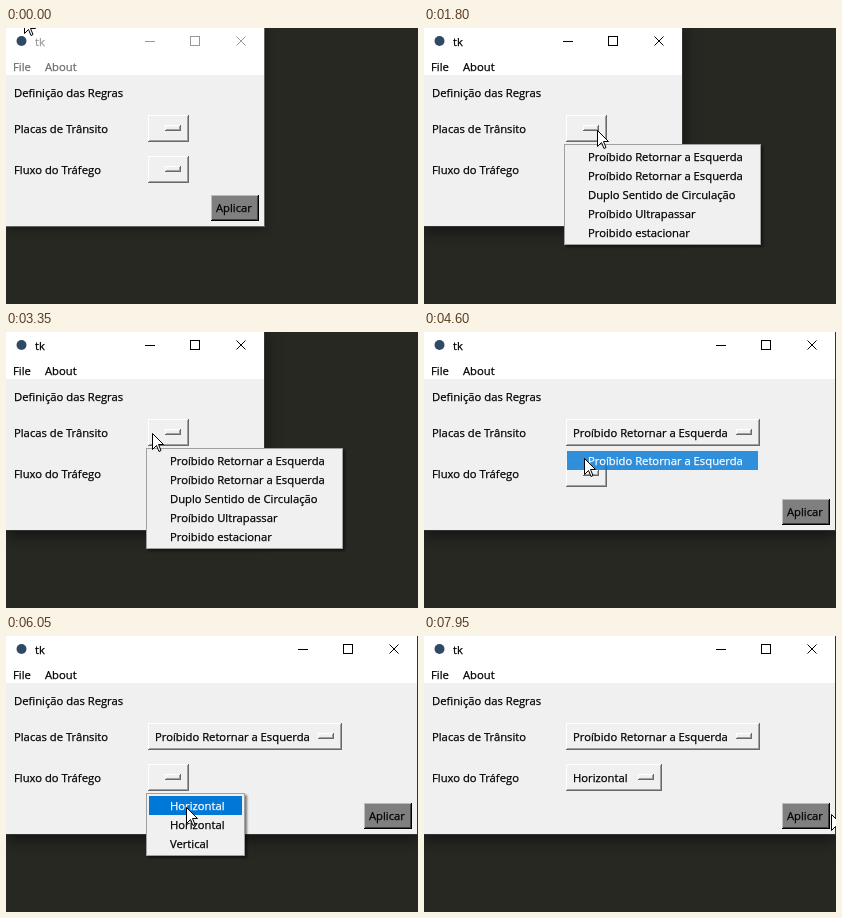
Recreate the animation shown at these times as an HTML page. Size 412 by 276 pixels, loop 8000 ms.

```html
<!DOCTYPE html>
<html lang="pt">
<head>
<meta charset="utf-8">
<title>tk</title>
<style>
  html, body { margin: 0; width: 100%; height: 100%; overflow: hidden; background: #272822; }
  svg { display: block; width: 412px; height: 276px; color: #000; }
  text {
    font: 11.25px "Open Sans", "Noto Sans", sans-serif; white-space: pre;
    fill: currentColor; stroke: currentColor; stroke-width: .25px;
  }
  rect, .edge { shape-rendering: crispEdges; }
  .line { stroke: currentColor; fill: none; }
  .menu { filter: drop-shadow(2px 2px 1px rgba(0, 0, 0, .5)); }
  .lit { color: #fff; }
</style>
</head>
<body>
<svg id="stage" viewBox="0 0 412 276"></svg>
<script>
const LOOP = 8000, TICK = 50, ROW = 19;
const FOCUS = 1600, FIRST = 4600, SECOND = 7450;
const LEFT = 'Proíbido Retornar a Esquerda';
const FACE = ['#f0f0f0', '#fff', '#a0a0a0', '#696969'];
const GRAY = ['#7f7f7f', '#bdbdbd', '#404040', '#000'];

// Each menu may open more than once; the last closing picks a row
const menus = [
  { id: 'signs', y: 116, w: 197, open: [[FOCUS, 1900], [2800, FIRST]],
    items: [LEFT, LEFT, 'Duplo Sentido de Circulação', 'Proíbido Ultrapassar', 'Proibido estacionar'] },
  { id: 'flows', y: 157, w: 99, open: [[5600, SECOND]],
    items: ['Horizontal', 'Horizontal', 'Vertical'] }
];

// Pointer moves: start, end, destination
const moves = [
  [100, 750, 178, 89], [1000, 1300, 173, 102], [2150, 2600, 171, 99],
  [3050, 3150, 152, 132], [3300, 3350, 146, 101], [3800, 4150, 160, 126],
  [4950, 5450, 175, 149], [5750, 6050, 180, 171], [7050, 7150, 180, 185],
  [7550, 7950, 407, 178]
];

const rect = (x, y, w, h, fill, cls = '') =>
  `<rect x="${x}" y="${y}" width="${w}" height="${h}" fill="${fill}" class="${cls}"/>`;
const text = (x, y, s) => `<text x="${x}" y="${y}">${s}</text>`;
const group = (id, body, cls = '') => `<g id="${id}" class="${cls}">${body}</g>`;

// Raised box: light top and left edges, dark bottom and right edges
const raised = (x, y, w, h, [fill, light, mid, dark]) =>
  rect(x, y, w, h, dark) + rect(x, y, w - 1, h - 1, light) +
  rect(x + 1, y + 1, w - 2, h - 2, mid) + rect(x + 1, y + 1, w - 3, h - 3, fill);

const option = (id, y, right, label) => group(id,
  raised(142, y, right - 142, 27, FACE) +
  raised(right - 24, y + 10, 16, 6, FACE) +
  text(149, y + 18, label));

const rowTop = (m, i) => m.y + 3 + i * ROW;
const label = (m, s, i) => text(164, rowTop(m, i) + 14, s);

const menu = m => group(m.id,
  rect(140, m.y, m.w, m.items.length * ROW + 6, '#a0a0a0') +
  rect(141, m.y + 1, m.w - 2, m.items.length * ROW + 4, '#f0f0f0') +
  m.items.map((s, i) => label(m, s, i)).join(''), 'menu') +
  m.items.map((s, i) => group(m.id + i,
    rect(143, rowTop(m, i), m.w - 6, ROW, '#0078d7') + label(m, s, i), 'lit')).join('');

stage.innerHTML =
  group('shadow', rect(0, -4, 259, 203, 'currentColor', 'border')) +
  rect(0, 0, 258, 198, '#f0f0f0', 'pane') +
  rect(0, 0, 258, 47, '#fff', 'pane') +
  '<circle cx="15.5" cy="13" r="5" fill="#2f4a63"/>' +
  group('title', text(29, 18, 'tk')) +
  group('bar', text(7, 43, 'File') + text(39, 43, 'About')) +
  group('side',
    group('controls',
      '<path class="line edge" d="M139 13.5h10M184.5 8.5h9v9h-9z"/>' +
      '<path class="line" d="M230.5 8.5l9 9M239.5 8.5l-9 9"/>') +
    raised(205, 167, 48, 26, GRAY) + text(210, 184, 'Aplicar')) +
  text(8, 69, 'Definição das Regras') +
  text(8, 105, 'Placas de Trânsito') +
  text(8, 146, 'Fluxo do Tráfego') +
  option('sign', 87, 183, '') + option('signSet', 87, 336, LEFT) +
  option('flow', 128, 183, '') + option('flowSet', 128, 238, 'Horizontal') +
  menus.map(menu).join('') +
  group('cursor', '<path d="M.5.5V16.5L4.5 12.5 7 18.5 9 17.5 6.5 11.5H11.5Z" fill="#fff" stroke="#000"/>');

const ramp = (t, from, span) => Math.min(1, Math.max(0, (t - from) / span));
const ease = p => p * p * (3 - 2 * p);

function pointer(t) {
  let x = 18, y = -11;
  for (const [from, to, nx, ny] of moves) {
    const e = ease(ramp(t, from - TICK, to - from + TICK));
    x += (nx - x) * e;
    y += (ny - y) * e;
  }
  return [Math.round(x), Math.round(y)];
}

// Samples a function of time into hard steps, leaving out repeats
const start = document.timeline.currentTime ?? 0;
function play(selector, prop, valueAt) {
  const frames = [];
  let last;
  for (let t = 0; t < LOOP; t += TICK) {
    const value = valueAt(t);
    if (value !== last) frames.push({ offset: t / LOOP, [prop]: value, easing: 'steps(1, end)' });
    last = value;
  }
  frames.push({ offset: 1, [prop]: last });
  for (const el of document.querySelectorAll(selector)) {
    el.animate(frames, { duration: LOOP, iterations: Infinity }).startTime = start;
  }
}
const swap = (selector, prop, when, a, b) => play(selector, prop, t => t < when ? a : b);

swap('#title, #controls', 'color', FOCUS, '#999', '#000');
swap('#bar', 'color', FOCUS, '#6d6d6d', '#000');
swap('#shadow', 'color', FOCUS, '#666', '#333');
swap('#shadow', 'filter', FOCUS,
  'drop-shadow(0 2px 4px rgba(0, 0, 0, .4))', 'drop-shadow(0 4px 8px rgba(0, 0, 0, .55))');

swap('.pane', 'width', FIRST, '258px', '411px');
swap('.border', 'width', FIRST, '259px', '412px');
swap('#side', 'transform', FIRST, 'translate(0px, 0px)', 'translate(153px, 0px)');
for (const [id, when] of [['#sign', FIRST], ['#flow', SECOND]]) {
  swap(id, 'opacity', when, 1, 0);
  swap(id + 'Set', 'opacity', when, 0, 1);
}

for (const m of menus) {
  const [on, off] = m.open.at(-1);
  play('#' + m.id, 'opacity', t => {
    const span = m.open.find(([a, b]) => t >= a && t < b);
    return span ? ramp(t, span[0] - 20, 120) : 0;
  });
  // The row under the pointer is lit; the picked row fades after closing
  m.items.forEach((_, i) => play('#' + m.id + i, 'opacity', t => {
    const held = Math.min(t, off - TICK);
    const row = Math.floor((pointer(held)[1] - rowTop(m, 0)) / ROW);
    return held >= on && row === i ? 1 - ramp(t, off - TICK, 250) : 0;
  }));
}

play('#cursor', 'transform', t => {
  const [x, y] = pointer(t);
  return `translate(${x}px, ${y}px)`;
});
</script>
</body>
</html>
```
